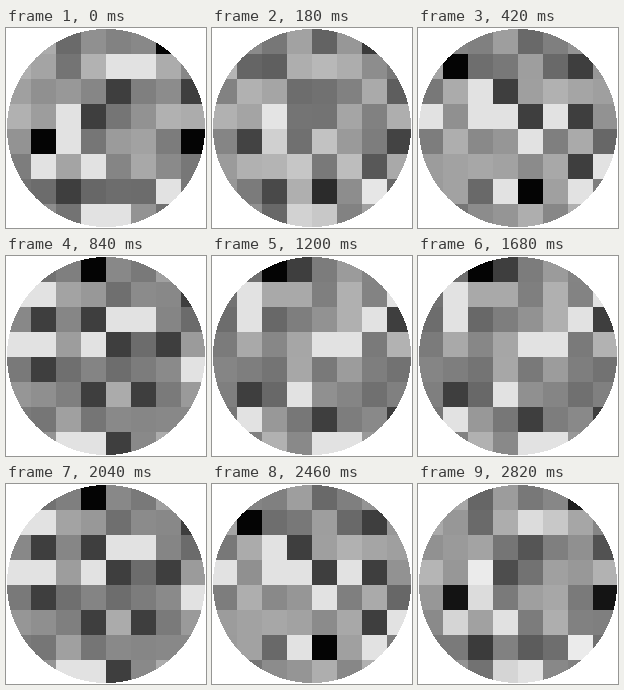
Recreate the animation shown at these times as an HTML page with a canvas. Size 200 by 200 pixels, loop 2880 ms.

```html
<!DOCTYPE html>
<html lang="en">
<head>
<meta charset="utf-8">
<title>Grey mosaic</title>
<style>
html, body { margin: 0; width: 100%; height: 100%; overflow: hidden; background: #fff; }
canvas { display: block; width: 200px; height: 200px; }
</style>
</head>
<body>
<canvas id="stage" width="200" height="200"></canvas>
<script>
const ctx = document.getElementById('stage').getContext('2d');
const LOOP = 2880, STEP = 60, CELL = 25, RADIUS = 99, DRIFT = 22;
const BLACK = 4, DARK = 62, LIGHT = 226;

// Accent cells are written as row and column digits; the rest is seeded mid grey.
const poses = [
  { at: 0, black: [6, 41, 47], dark: [24, 33, 62, 27],
    light: [14, 15, 32, 42, 51, 53, 66, 73, 74] },
  { at: 420, black: [11, 64], dark: [16, 23, 34, 36, 56],
    light: [22, 30, 32, 33, 35, 44, 57, 63, 66] },
  { at: 840, black: [3], dark: [17, 21, 23, 34, 36, 41, 53, 55, 74],
    light: [10, 11, 24, 25, 30, 31, 33, 47, 72, 73] },
  { at: 1200, black: [2], dark: [3, 27, 51, 64, 67],
    light: [11, 17, 21, 26, 34, 35, 53, 61, 74, 75] }
];
// The mosaic turns back at half time and passes the last pose twice.
poses.push({ ...poses[poses.length - 1], at: LOOP - 1200 });

function random(seed) {
  const x = Math.sin(seed * 12.9898) * 43758.5453;
  return x - Math.floor(x);
}

function poseShade(pose, id) {
  if (pose.black.includes(id)) return BLACK;
  if (pose.dark.includes(id)) return DARK;
  if (pose.light.includes(id)) return LIGHT;
  const seed = id + Math.min(pose.at, LOOP - pose.at);
  return 102 + 76 * random(seed);
}

function shadeAt(id, t) {
  let k = 0;
  while (t >= poses[k + 1].at) k++;
  const a = poses[k], b = poses[k + 1];
  const u = (t - a.at) / (b.at - a.at);
  const from = poseShade(a, id), to = poseShade(b, id);
  const wander = DRIFT * Math.sin(Math.PI * u) * Math.sin(id * 2.4 + t / 110);
  return Math.round(Math.max(0, Math.min(255, from + (to - from) * u + wander)));
}

function draw(time) {
  const t = Math.floor((time % LOOP) / STEP) * STEP;
  const folded = Math.min(t, LOOP - t);
  for (let row = 0; row < 8; row++) {
    for (let col = 0; col < 8; col++) {
      const v = shadeAt(row * 10 + col, folded);
      const top = row ? row * CELL + 1 : 0;
      ctx.fillStyle = `rgb(${v}, ${v}, ${v})`;
      ctx.fillRect(col * CELL, top, CELL, (row + 1) * CELL + 1 - top);
    }
  }
}

// Whole-pixel rows give the disc a hard rim.
function clipDisc() {
  ctx.beginPath();
  for (let y = 100 - RADIUS; y < 100 + RADIUS; y++) {
    const half = Math.round(Math.sqrt(RADIUS ** 2 - (y + 0.5 - 100) ** 2));
    ctx.rect(100 - half, y, half * 2, 1);
  }
  ctx.clip();
}

clipDisc();
const start = performance.now();
function tick() {
  draw(performance.now() - start);
  requestAnimationFrame(tick);
}
tick();
</script>
</body>
</html>
```
